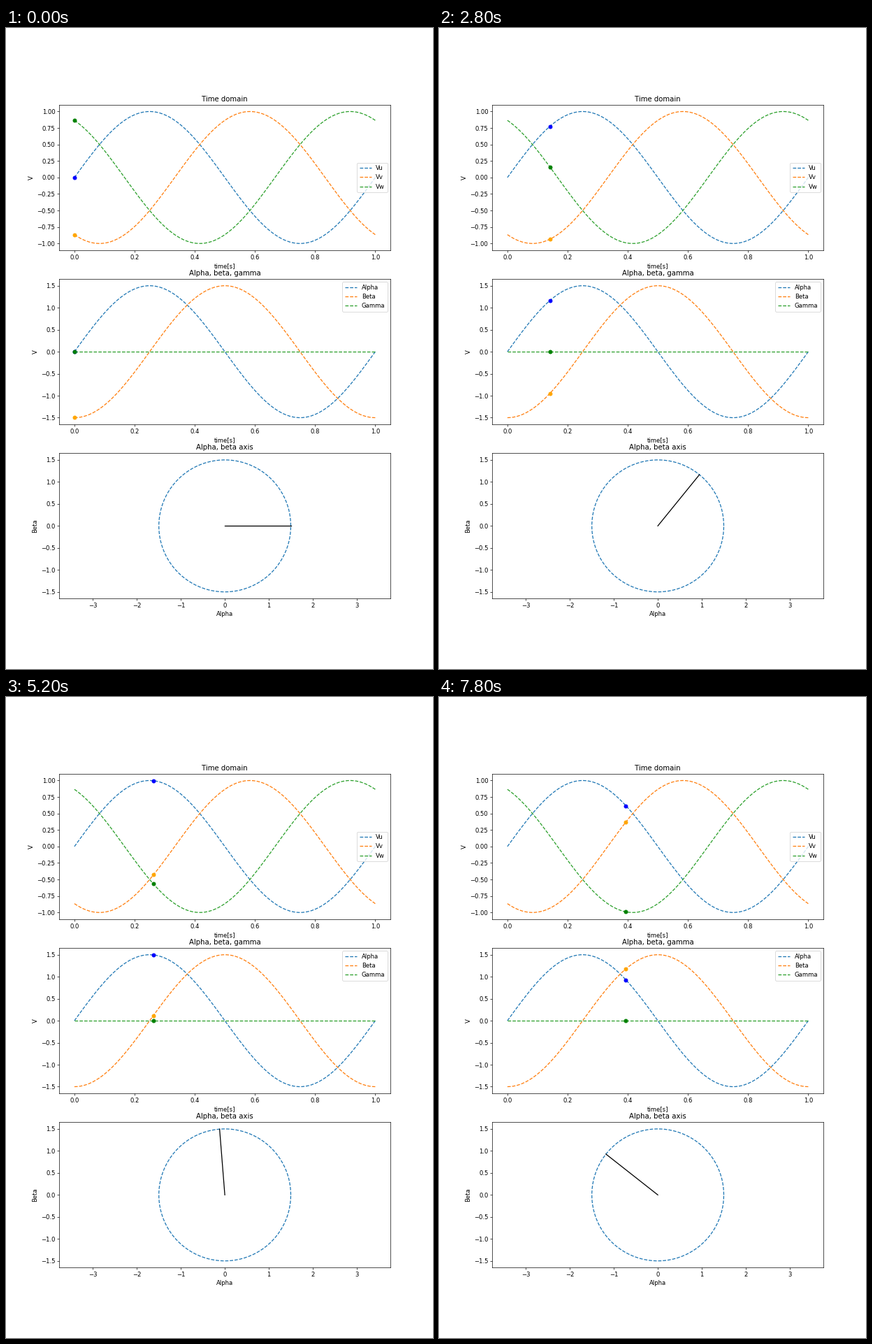
Recreate the animation shown at these times as a matplotlib script. Size 611 by 917 pixels, loop 8 s.

```python
import numpy as np
import matplotlib.pyplot as plt
from matplotlib.animation import FuncAnimation

DPI = 61.1
W, H = 611, 917
FRAMES, STEP = 40, 200
DOTS = ("blue", "orange", "green")

t = np.linspace(0, 1, 100)
w = 2 * np.pi * t

phases = [np.sin(w + k * 2 * np.pi / 3) for k in (0, -1, 1)]
clarke = [1.5 * np.sin(w), -1.5 * np.cos(w), 0 * w]

# the tiny margin keeps the pixel size from being rounded down
fig, axes = plt.subplots(
    3, 1, figsize=((W + 1e-4) / DPI, (H + 1e-4) / DPI), dpi=DPI)


def wave_plot(ax, waves, names, title, loc):
    for y, name in zip(waves, names):
        ax.plot(t, y, "--", label=name)
    ax.set(title=title, xlabel="time[s]", ylabel="V")
    ax.legend(loc=loc)
    return [(ax.plot([], [], "o", color=c)[0], y)
            for c, y in zip(DOTS, waves)]


dots = wave_plot(axes[0], phases, ("Vu", "Vv", "Vw"),
                 "Time domain", "center right")
dots += wave_plot(axes[1], clarke, ("Alpha", "Beta", "Gamma"),
                  "Alpha, beta, gamma", "upper right")

plane = axes[2]
px, py = -clarke[1], clarke[0]
plane.plot(px, py, "--")
plane.set(title="Alpha, beta axis", xlabel="Alpha", ylabel="Beta")
plane.axis("equal")
vector, = plane.plot([0, px[0]], [0, py[0]], color="black")


def update(i):
    for dot, y in dots:
        dot.set_data([t[i]], [y[i]])
    vector.set_data([0, px[i]], [0, py[i]])
    return [dot for dot, _ in dots] + [vector]


anim = FuncAnimation(fig, update, frames=FRAMES, interval=STEP,
                     init_func=lambda: update(0), repeat=True,
                     repeat_delay=0, blit=False)
plt.show()
```
